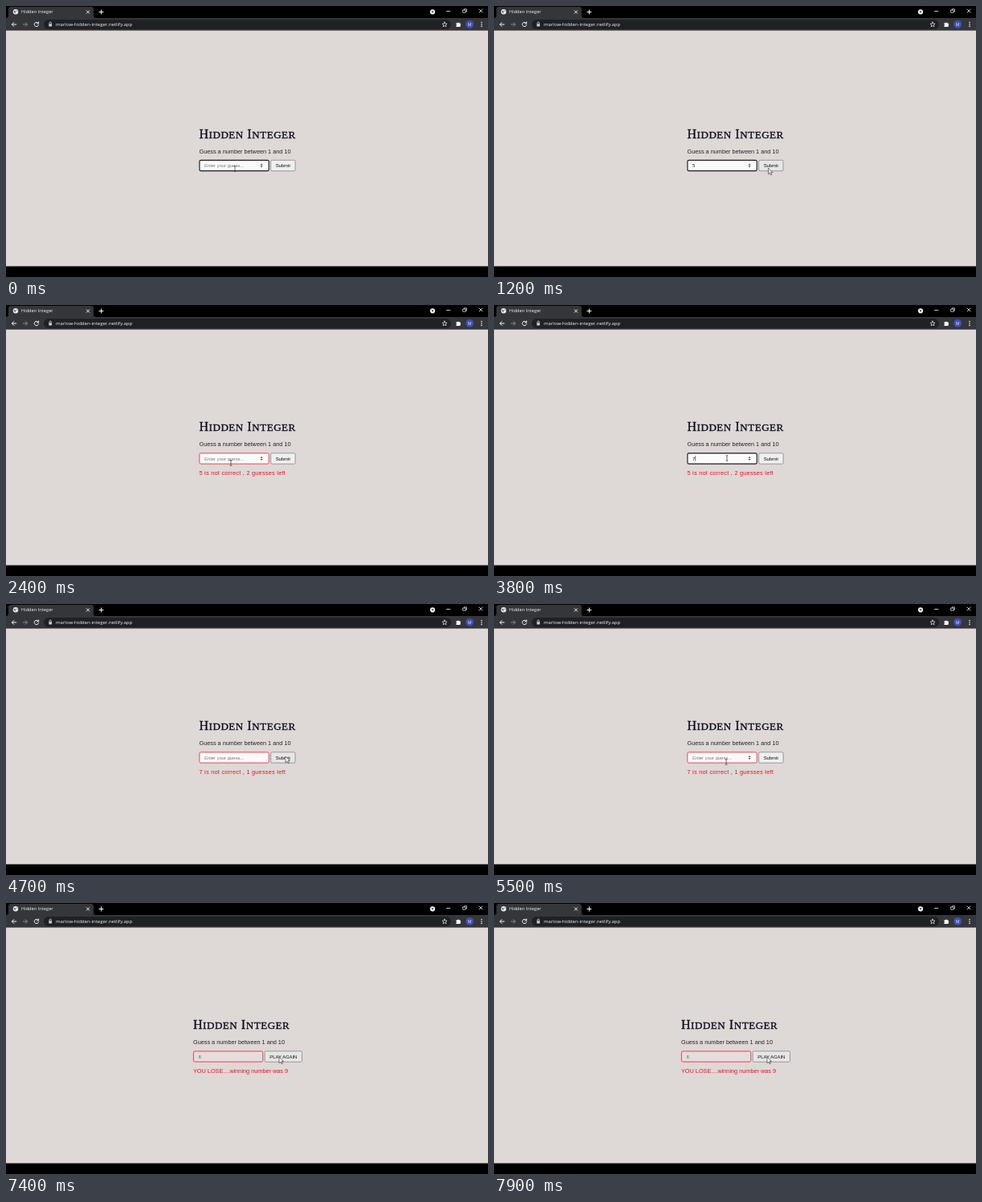
Write an HTML page that moves like this. It is 600x338 px and loops after 8000 ms.

```html
<!DOCTYPE html>
<html lang="en">
<head>
<meta charset="utf-8">
<title>Hidden Integer</title>
<style>
  html, body { margin: 0; width: 100%; height: 100%; overflow: hidden; background: #000; }
  svg { display: block; width: 100%; height: 100%; }
  text { font-family: "Liberation Sans", Arial, sans-serif; white-space: pre; }
  .chrome { font-family: "Open Sans", sans-serif; fill: #f1f3f4; }
  .title { font: 16px "Liberation Serif", serif; letter-spacing: .55px; fill: #0b0b1e; stroke: #0b0b1e; stroke-width: .3px; }
  .title .small { font-size: 13px; }
  .body { font-size: 7.3px; fill: #24242a; }
  .control { font-size: 5.9px; }
  .icon { fill: none; stroke: #f1f3f4; stroke-width: 1; stroke-linecap: round; stroke-linejoin: round; }
</style>
</head>
<body>
<svg viewBox="0 0 600 338">
  <rect width="600" height="338" fill="#000"/>

  <!-- Browser frame -->
  <path d="M0 15Q3 15 3 12V4Q3 1 6 1H106Q109 1 109 4V12Q109 15 112 15H600V31H0Z" fill="#35363a"/>
  <rect y="30.6" width="600" height="294" fill="#ded8d6"/>
  <rect x="47" y="17" width="507" height="12" rx="6" fill="#202124"/>
  <circle cx="12" cy="7.3" r="3.2" fill="#e8eaed"/>
  <path d="M9.8 6.4L11 5.6L12.2 7L11.5 9.2L10 7.6ZM13 5L14.3 6.2L13.4 7Z" fill="#66686c"/>
  <text class="chrome" x="19" y="9.3" font-size="5.7">Hidden Integer</text>
  <text class="chrome" x="62" y="25.1" font-size="6">marlow-hidden-integer.netlify.app</text>
  <g class="icon">
    <path d="M100.3 5.8L103.7 9.2M103.7 5.8L100.3 9.2M116 7.5H121M118.5 5V10"/>
    <path d="M548.5 6.5H552.8M589 4L593 8M593 4L589 8" stroke-width=".8"/>
    <path d="M569 5H572.2V8.2H569ZM570.2 5V3.8H573.4V7H572.2" stroke-width=".7"/>
    <path d="M12.7 23H7.5M9.8 20.6L7.4 23L9.8 25.4"/>
    <path d="M21.3 23H26.5M24.2 20.6L26.6 23L24.2 25.4" stroke="#85878a"/>
    <path d="M40.2 21.4A2.7 2.7 0 1 0 40.6 23.7M40.6 20V21.9H38.6"/>
    <path d="M54 22.5V21.2A1.2 1.2 0 0 1 56.4 21.2V22.5" stroke-width=".7"/>
    <path d="M546 20L546.9 22L549 22.2L547.4 23.6L547.9 25.8L546 24.6L544.1 25.8L544.6 23.6L543 22.2L545.1 22Z" stroke-width=".7"/>
  </g>
  <rect x="53.3" y="22.2" width="3.8" height="3.3" rx=".5" fill="#c8cacd"/>
  <path d="M560.4 21.2H562A1.1 1.1 0 0 1 564 21.2H565.5V22.6A1.1 1.1 0 0 1 565.5 24.6V26H560.4V24.5A1 1 0 0 0 560.4 22.7Z" fill="#fff"/>
  <circle cx="531" cy="7.3" r="3.1" fill="#f1f3f4"/>
  <path d="M529.5 6.5H532.5L531 8.6Z" fill="#111"/>
  <circle cx="577.2" cy="22.8" r="4.9" fill="#3f51b5"/>
  <text x="577.2" y="24.7" font-size="5.2" text-anchor="middle" fill="#e4e6f5">M</text>
  <g fill="#e8eaed">
    <circle cx="592" cy="20.6" r=".8"/><circle cx="592" cy="23" r=".8"/><circle cx="592" cy="25.4" r=".8"/>
  </g>

  <g id="page">
    <text class="title" x="240.5" y="164.7">H<tspan class="small">IDDEN</tspan> I<tspan class="small">NTEGER</tspan></text>
    <text class="body" x="240.5" y="183.6">Guess a number between 1 and 10</text>
    <rect id="field" x="240.9" y="192.4" width="86.3" height="13.2" rx="1.7"/>
    <text id="value" class="control" x="247" y="201"></text>
    <path id="caret" d="M0 195.6V202.2" stroke="#111" stroke-width=".6"/>
    <path id="spinner" d="M316.4 198.5L318 196.6L319.6 198.5ZM316.4 199.5L318 201.4L319.6 199.5Z" fill="#505050"/>
    <rect id="button" x="329.6" y="192.3" height="13.4" rx="1.5" stroke="#77777b" stroke-width=".7"/>
    <text id="label" class="control" y="201" text-anchor="middle" fill="#111"></text>
    <text id="message" class="body" x="240.5" y="219" style="fill:#e6141f"></text>
  </g>

  <g id="pointer">
    <path id="arrow" d="M0 0V7.6L1.8 6L3 8.7L4.3 8.1L3.1 5.5H5.4Z" fill="#fff" stroke="#222" stroke-width=".6" stroke-linejoin="round"/>
    <path id="beam" d="M-1.3 -3.2H1.3M0 -3.2V3.2M-1.3 3.2H1.3" fill="none" stroke="#333" stroke-width=".7"/>
  </g>
</svg>
<script>
  const LOOP = 8000, TICK = 100;
  const PLACEHOLDER = "Enter your guess...";
  const $ = id => document.getElementById(id);
  const set = (id, attrs) => {
    for (const name in attrs) $(id).setAttribute(name, attrs[name]);
  };
  const show = (id, on) => set(id, { visibility: on ? "visible" : "hidden" });

  // Each row holds from its time until the next one.
  const states = [
    { at: 0, focus: true },
    { at: 500, focus: true, caret: true },
    { at: 700, focus: true, value: "5", caret: true },
    { at: 1200, focus: true, value: "5" },
    { at: 1500, message: "5 is not correct , 2 guesses left" },
    { at: 2600, focus: true, caret: true },
    { at: 3100, focus: true },
    { at: 3500, focus: true, value: "7", caret: true },
    { at: 4000, focus: true, value: "7" },
    { at: 4400, message: "7 is not correct , 1 guesses left" },
    { at: 5700, focus: true, caret: true },
    { at: 6300, focus: true },
    { at: 6600, focus: true, value: "8", caret: true },
    { at: 7100, focus: true, value: "8" },
    { at: 7400, value: "8", over: true, message: "YOU LOSE....winning number was 9" }
  ];

  // Pointer track: time, x, y
  const track = [
    [0, 285, 203], [800, 285, 203], [1300, 348, 202], [1600, 348, 202],
    [2300, 280, 197], [2400, 280, 197], [2800, 284, 193], [3000, 284, 193],
    [3200, 290, 191], [3800, 290, 191], [4100, 345, 201], [4300, 348, 190],
    [4700, 348, 190], [5200, 289, 197], [6600, 290, 197], [6900, 322, 201],
    [7200, 340, 192], [8000, 340, 192]
  ];

  function pointerAt(t) {
    const i = track.findIndex(p => p[0] > t);
    const [t0, x0, y0] = track[i - 1], [t1, x1, y1] = track[i];
    const u = (t - t0) / (t1 - t0), e = u * u * (3 - 2 * u);
    return [x0 + (x1 - x0) * e, y0 + (y1 - y0) * e];
  }

  function draw(t) {
    const state = states.findLast(s => s.at <= t);
    const { focus, value, caret, over } = state;
    const lastMessage = states.findLast(s => s.at <= t && s.message);
    const dx = over ? -7.5 : 0, dy = lastMessage ? -7.5 : 0;
    const [x, y] = pointerAt(t);
    const inField = x > 240 + dx && x < 328 + dx && y > 191 + dy && y < 207 + dy;
    const onButton = !inField && x > 329 && x < 361 && y > 192 + dy && y < 206 + dy;
    const buttonWidth = over ? 46.4 : 30.4;

    set("page", { transform: `translate(${dx} ${dy})` });
    set("field", {
      fill: over ? "#e2dedd" : "#fcfbfb",
      stroke: focus ? "#1c1c22" : lastMessage ? "#e0222c" : "#77777b",
      "stroke-width": focus ? 1.15 : .8
    });
    $("value").textContent = value || PLACEHOLDER;
    set("value", { fill: over ? "#66666a" : value ? "#111" : "#77777b" });
    show("caret", caret);
    set("caret", { transform: `translate(${value ? 250.7 : 247.3} 0)` });
    show("spinner", !over && (focus || inField));
    set("button", { width: buttonWidth, fill: onButton ? "#e6e6e6" : "#efefef" });
    $("label").textContent = over ? "PLAY AGAIN" : "Submit";
    set("label", { x: 329.6 + buttonWidth / 2 });
    $("message").textContent = lastMessage ? lastMessage.message : "";
    set("message", { "letter-spacing": over ? 0 : .26 });
    set("pointer", { transform: `translate(${x} ${y})` });
    show("arrow", !inField);
    show("beam", inField);
  }

  function frame() {
    const t = performance.now() % LOOP;
    draw(Math.floor(t / TICK) * TICK);
    requestAnimationFrame(frame);
  }
  frame();
</script>
</body>
</html>
```
